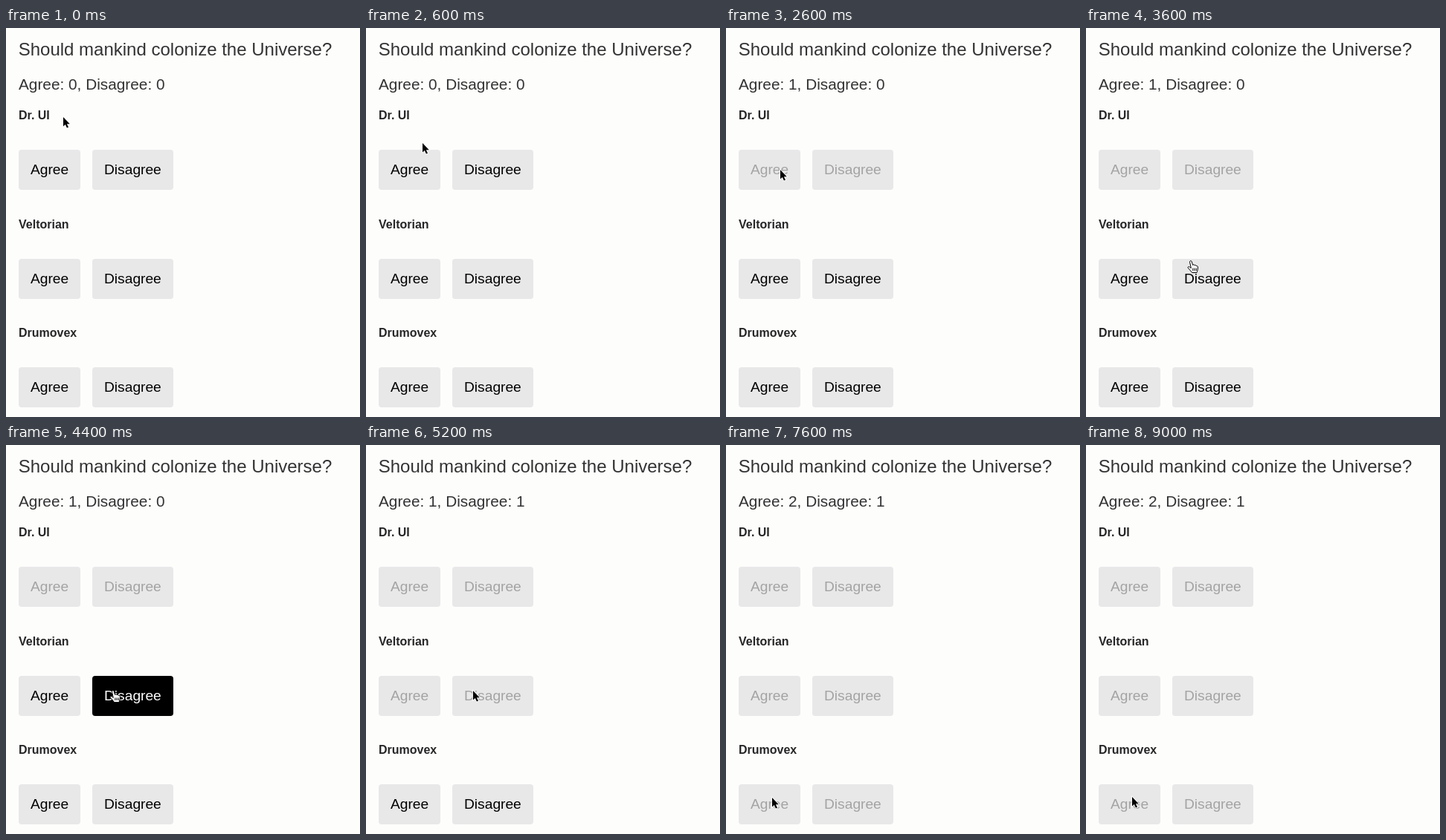
Write an HTML page that moves like this. It is 476 px wide and 524 px high and loops after 9200 ms.

```html
<!DOCTYPE html>
<html lang="en">
<head>
<meta charset="utf-8">
<title>Voting</title>
<style>
  html, body { margin: 0; width: 100%; height: 100%; overflow: hidden; background: #fdfdfc; }
  svg { display: block; width: 476px; height: 524px; font-family: "Liberation Sans", Arial, sans-serif; }
  .title, .tally { fill: #333; }
  .title { font-size: 24px; }
  .tally { font-size: 20.8px; }
  .name { font-size: 16px; font-weight: bold; fill: #262626; }
  .button { font-size: 19.2px; }
  .button rect { fill: #e9e8e9; }
  .button text { fill: #000; }
  .button.hover rect { fill: #000; }
  .button.hover text { fill: #fff; }
  .button.disabled text { fill: #a3a3a3; }
  #arrow { fill: #000; stroke: #fff; stroke-width: 1.6; paint-order: stroke; }
  #hand { fill: #fff; stroke: #000; stroke-linejoin: round; }
  #ring { fill: none; }
</style>
</head>
<body>
<svg id="stage" viewBox="0 0 476 524">
  <text class="title" x="16.7" y="37">Should mankind colonize the Universe?</text>
  <text class="tally" id="tally" x="17" y="83"></text>
  <g id="voters"></g>
  <g id="pointer">
    <g id="ring">
      <circle r="29" stroke="#000" stroke-width="4.4"/>
      <circle r="28.7" stroke="#fff" stroke-width="1.3"/>
    </g>
    <path id="arrow" d="M0 0V12.5L2.8 9.9 4.9 14.6 7 13.7 4.9 9.2H8.8Z"/>
    <g id="hand">
      <path d="M-1.5 1.2C-1.8-.6.8-1 1.2.8L2.6 5.4C3 4.4 4.9 4.5 5 5.8 5.6 5 7.2 5.3 7.3 6.6 8 6 9.4 6.6 9.4 8 9.5 11 9 12.5 8 15.5H1.6C.2 13-2.4 11.3-3.8 9.2-4.6 7.8-2.8 6.9-1.6 8L.3 9.4Z"/>
      <path fill="none" d="M2.8 9.5v3.5M5 9.5v3.5M7.2 9.5v3.5"/>
    </g>
  </g>
</svg>
<script>
const LOOP = 9200, STEP = 200;

// Each vote: the chosen button, when it is hovered and when it counts.
const voters = [
  { name: "Dr. UI", y: 164, choice: 0, hover: 1000, done: 2000 },
  { name: "Veltorian", y: 311, choice: 1, hover: 3800, done: 4800 },
  { name: "Drumovex", y: 457, choice: 0, hover: 6600, done: 7600 }
];

// Pointer waypoints: time, x, y
const path = [
  [0, 77, 120], [200, 77, 122], [600, 76, 155], [1000, 73, 190], [2600, 73, 191],
  [2800, 78, 200], [3200, 112, 262], [3600, 141, 314], [3800, 144, 331],
  [5400, 144, 331], [5600, 138, 342], [6400, 67, 466], [6600, 62, 475], [LOOP, 62, 474]
];

const $ = id => document.getElementById(id);
const show = (id, on) => { $(id).style.display = on ? "" : "none"; };

function add(parent, tag, attrs, text = "") {
  const el = document.createElementNS("http://www.w3.org/2000/svg", tag);
  for (const key in attrs) el.setAttribute(key, attrs[key]);
  el.textContent = text;
  return parent.appendChild(el);
}

function addButton(label, x, y, width) {
  const g = add($("voters"), "g", { class: "button" });
  add(g, "rect", { x, y, width, height: 54, rx: 4 });
  add(g, "text", { x: x + 16, y: y + 33 }, label);
  return g;
}

for (const v of voters) {
  add($("voters"), "text", { class: "name", x: 17, y: v.y - 41 }, v.name);
  v.buttons = [addButton("Agree", 17, v.y, 83), addButton("Disagree", 116, v.y, 109)];
}

function pointAt(t) {
  const i = path.findIndex(p => p[0] > t);
  const [t0, x0, y0] = path[i - 1], [t1, x1, y1] = path[i];
  const k = (t - t0) / (t1 - t0);
  return [x0 + (x1 - x0) * k, y0 + (y1 - y0) * k].map(Math.round);
}

function draw(t) {
  const count = [0, 0];
  let hand = false, ring = false;
  for (const v of voters) {
    const done = t >= v.done;
    if (done) count[v.choice]++;
    hand ||= !done && t >= v.hover - STEP;
    ring ||= !done && t >= v.done - STEP;
    v.buttons.forEach((b, i) => {
      b.classList.toggle("disabled", done);
      b.classList.toggle("hover", !done && i === v.choice && t >= v.hover);
    });
  }
  $("tally").textContent = `Agree: ${count[0]}, Disagree: ${count[1]}`;
  $("pointer").setAttribute("transform", `translate(${pointAt(t)})`);
  show("hand", hand);
  show("arrow", !hand);
  show("ring", ring);
}

const start = performance.now();
function tick() {
  const t = (performance.now() - start) % LOOP;
  draw(Math.floor(t / STEP) * STEP);
  requestAnimationFrame(tick);
}
tick();
</script>
</body>
</html>
```
